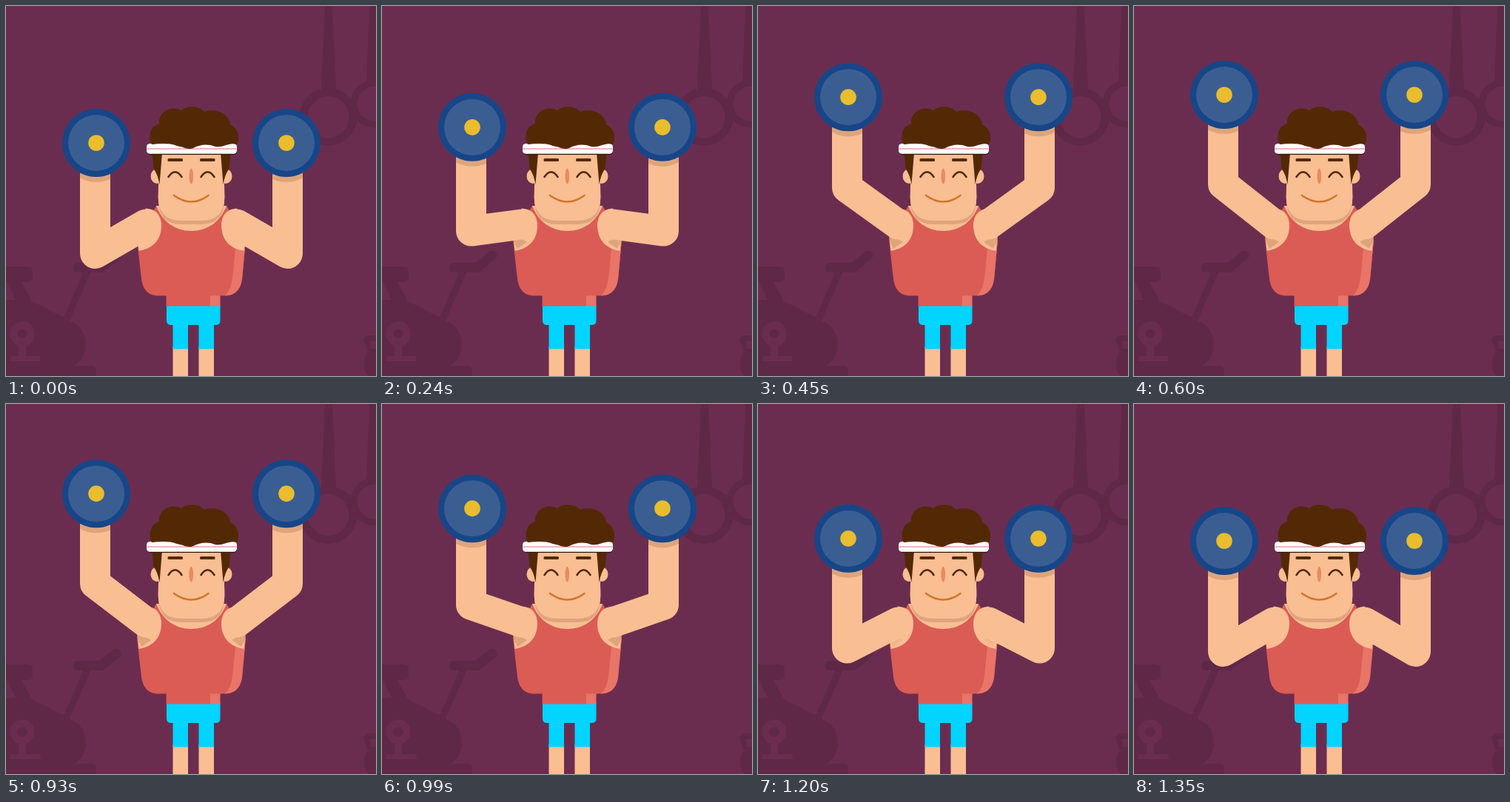
Animation, 500 px wide and 500 px high, one loop 1650 ms. Source, as an HTML page:

```html
<!DOCTYPE html>
<html lang="en">
<head>
<meta charset="utf-8">
<title>Dumbbell press</title>
<style>
  html, body { margin: 0; width: 100%; height: 100%; overflow: hidden; background: #6b2d4f; }
  svg { display: block; width: 100vw; height: 100vh; }
  .dim { fill: #5f2847; }
  .dimLine { fill: none; stroke: #5f2847; }
  .wall { fill: #6b2d4f; }
  .skin { fill: #f9be92; }
  .shade { fill: #dea57c; }
  .shirt { fill: #db5c55; }
  .light { fill: #e97468; }
  .shorts { fill: #00d4ff; }
  .hair { fill: #532905; }
  .limb { fill: none; stroke: #f9be92; stroke-width: 41; stroke-linejoin: round; stroke-linecap: round; }
  .line { fill: none; stroke-width: 2.6; stroke-linecap: round; }
</style>
</head>
<body>
<svg viewBox="0 0 500 500">
  <defs>
    <clipPath id="forearm"><rect x="100" y="0" width="41" height="400"/></clipPath>

    <g id="arm">
      <path class="skin" d="M177.500 312L189 273.500Q210 275 210 298C209 318 197 328 179.500 331Z"/>
      <path id="pit" class="shade" d="M177 308L196 319L183 328L178 318Z"/>
      <path id="limb" class="limb"/>
      <g clip-path="url(#forearm)"><circle id="cast" class="shade" cx="122" r="46"/></g>
      <g id="plate">
        <circle r="46" fill="#174688"/>
        <circle r="38" fill="#3b5e92"/>
        <circle r="10.800" fill="#e9bd2d"/>
      </g>
    </g>

    <g id="side">
      <ellipse class="skin" cx="204" cy="230" rx="8.500" ry="10"/>
    </g>
    <path id="burn" class="hair" d="M197.500 198H211L207.500 241Q205 227 199.500 220Z"/>
    <g id="eye" stroke="#532905">
      <rect class="hair" x="218.500" y="206" width="20.500" height="4" rx="1.500" stroke="none"/>
      <path class="line" d="M219.500 231Q228.500 217.500 237.500 231"/>
    </g>
  </defs>

  <!-- rings -->
  <path class="dim" d="M431 0H441L446 114H426ZM491 0H500V104H487Z"/>
  <circle class="dimLine" cx="435.500" cy="150" r="33.500" stroke-width="11"/>
  <circle class="dimLine" cx="498" cy="132" r="28" stroke-width="9"/>

  <!-- exercise bike -->
  <path class="dim" d="M0 352H29Q36 352 36 359V366Q36 373 29 373H21L35 399L88 426C104 434 108 446 108 460Q106 479 92 486H115Q122 486 122 493V500H0V397H13L1 373H0Z"/>
  <path class="dimLine" d="M112 354L79 430" stroke-width="9"/>
  <path class="dimLine" d="M97 353.500H129L149 337" stroke-width="13" stroke-linecap="round" stroke-linejoin="round"/>
  <circle cx="22" cy="443" r="11.500" fill="none" stroke="#6b2d4f" stroke-width="10"/>
  <path class="wall" d="M17 455H27V473H43Q47 473 47 480H5Q5 473 9 473H17Z"/>

  <!-- kettlebell -->
  <path class="dim" d="M500 445H490Q482 447 484 455L489 468Q484 475 484 485Q484 495 490 500H500V463H494L491 453H500Z"/>

  <!-- legs and shorts -->
  <path class="skin" d="M225.500 460H246V500H225.500ZM260.500 460H281V500H260.500Z"/>
  <path class="shorts" d="M217 404H289.500V425Q289.500 431 283.500 431H281V463.500H260.500V431H246V463.500H225.500V431H223Q217 431 217 425Z"/>

  <!-- shirt -->
  <path class="shirt" d="M216.500 385H277V405.500H216.500Z"/>
  <path class="light" d="M276 385H289.500V405.500H276Z"/>
  <path class="shirt" d="M203 270H298L324 316L319 369Q316 391 296 391.500H205Q186 391 183 369L177 316Z"/>
  <path class="light" d="M324 316L319 369Q316 391 296 391.500C304 384 306 370 307 358L311 316Z"/>
  <path class="skin" d="M203 270C212 293 230 304 250.500 304S289 293 298 270Z"/>

  <use href="#arm"/>
  <use href="#arm" transform="matrix(-1 0 0 1 501 0)"/>

  <!-- head -->
  <use href="#side"/>
  <use href="#side" transform="matrix(-1 0 0 1 501 0)"/>
  <path class="shade" d="M206 250V264Q207 295 237 295H264Q294 295 295 264V250Z"/>
  <path class="skin" d="M207.500 195H293.500L295.500 258Q295 290 264 290H237Q206 290 205.500 258Z"/>
  <use href="#burn"/>
  <use href="#burn" transform="matrix(-1 0 0 1 501 0)"/>
  <use href="#eye"/>
  <use href="#eye" transform="matrix(-1 0 0 1 501 0)"/>
  <ellipse cx="250.300" cy="230" rx="2.800" ry="10.500" fill="#e98b5d"/>
  <path class="line" d="M227 256Q250.500 273 273.500 256" stroke="#d27627"/>

  <!-- headband and hair -->
  <rect x="191" y="188" width="121" height="13" rx="4.500" fill="#2a1405"/>
  <rect x="190" y="186" width="122" height="13.800" rx="4.500" fill="#fff"/>
  <path d="M190.500 193H311.500" stroke="#dc7078" stroke-width="1.200"/>
  <path class="hair" d="M197 187C192 178 194 162 207 159C206 143 222 134 237 141C244 134 261 134 268 143C283 137 302 146 303 160C313 164 317 177 312 187C300 184 294 192 283 190C273 186 262 187 253 192C246 195 239 190 231 189C221 185 209 186 197 187Z"/>
</svg>

<script>
  const LOOP = 1650, STEP = 30, STEPS = 15, LIFT = 180, LOWER = 930;
  const $ = id => document.getElementById(id);
  const mix = (a, b, p) => a + (b - a) * p;

  // Cubic bezier (.33, 0, 0, 1)
  function ease(x) {
    if (x <= 0 || x >= 1) return Math.min(1, Math.max(0, x));
    let lo = 0, hi = 1;
    for (let i = 0; i < 24; i++) {
      const s = (lo + hi) / 2;
      if (0.99 * s * (1 - s) ** 2 + s ** 3 < x) lo = s; else hi = s;
    }
    return lo * lo * (3 - 2 * lo);
  }

  const phase = (t, start) => ease((Math.floor((t - start) / STEP) + 1) / STEPS);

  function pose(p) {
    const plate = mix(185, 120, p), elbow = mix(334.5, 241, p);
    $('limb').setAttribute('d', `M120.500 ${plate}V${elbow}L189 295`);
    $('cast').setAttribute('cy', plate + 7);
    $('plate').setAttribute('transform', `translate(122 ${plate})`);
    $('pit').setAttribute('opacity', Math.min(1, p * 6));
  }

  function tick(now) {
    const t = now % LOOP;
    pose(phase(t, LIFT) - phase(t, LOWER));
    requestAnimationFrame(tick);
  }

  pose(0);
  requestAnimationFrame(tick);
</script>
</body>
</html>
```
